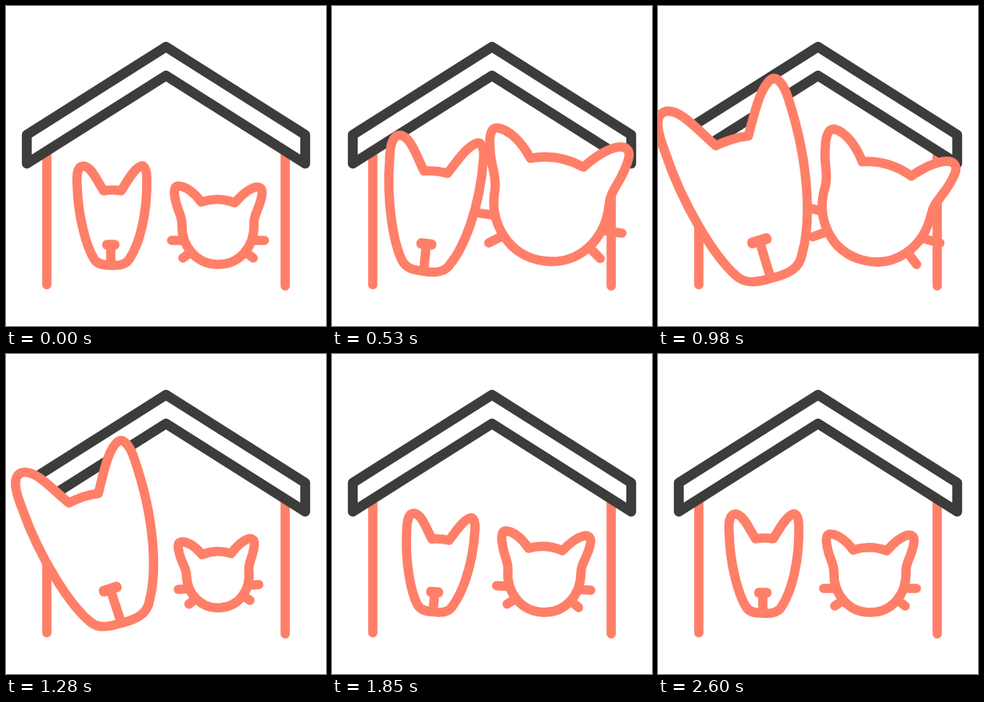
An HTML page that plays this animation: 400 px wide and 400 px high, repeating every 2630 ms.

```html
<!DOCTYPE html>
<html lang="en">
<head>
<meta charset="utf-8">
<title>Pet house</title>
<style>
  html, body { margin: 0; width: 100%; height: 100%; overflow: hidden; background: #fff; }
  svg { display: block; width: 100%; height: 100%; }
  path { fill: none; stroke: #ff7f68; stroke-width: 11.6; stroke-linecap: round; stroke-linejoin: round; vector-effect: non-scaling-stroke; }
  .face { fill: #fff; }
  .nose { fill: #ff7f68; }
  .roof { fill: #fff; stroke: #3c3c3b; stroke-width: 12.4; }
</style>
</head>
<body>
<svg viewBox="0 0 400 400">
  <path d="M51 186V348.500M349 186V350"/>
  <path class="roof" d="M200 51L374 161V197L200 87L26 197V161Z"/>
  <g id="cat">
    <path class="face" d="M244 245C236 234 225 225 215 225C209 226 210 235 212 243C214 255 220 262 220 273C219 300 238 323 265 323C293 323 311 300 310 272C309 261 318 252 320 235C321 227 316 225 310 227C301 230 293 238 286 246Q265 238 244 245Z"/>
    <path d="M207 293H222M221 315L231 308M309 293H323M300 308L309 315"/>
  </g>
  <g id="dog">
    <path class="face" d="M122 231C114 219 107 201 97 200C89 200 88 211 89 225C90 262 100 300 110 316C114 323 122 324 131 324C143 325 151 323 155 315C166 298 177 262 176 215C176 205 173 199 169 200C160 203 151 220 144 231Q133 229 122 231Z"/>
    <path class="nose" d="M126 298H136V299H126Z"/>
    <path d="M131 299V321"/>
  </g>
</svg>
<script>
const LOOP = 2630, HOLD = 230, STEP = 30;
const START = 200, LAG = 100, FREQ = 0.0075;

// Rest centre, full-size centre, growth, turn in degrees, and timing in ms
const cat = { id: 'cat', rest: [265, 280], big: [275, 245], grow: 0.71, turn: 15, rise: 440, release: 880, nudge: 0 };
const dog = { id: 'dog', rest: [131, 265], big: [108, 232], grow: 0.92, turn: -18, rise: 800, release: 1200, nudge: 10 };

const clamp = u => Math.min(1, Math.max(0, u));
const ease = u => { u = clamp(u); return u * u * (3 - 2 * u); };

// Damped swing from 1 to 0, starting at rest
const spring = (t, damp) =>
  Math.exp(-damp * t) * (Math.cos(FREQ * t) + damp / FREQ * Math.sin(FREQ * t));

// Swell to 1, hold, then spring back
const swell = (pet, t, damp) => t < pet.release
  ? ease((t - START) / pet.rise)
  : spring(t - pet.release, damp);

function place(pet, t) {
  const settle = 1 - ease((t - 2120) / 480);
  const size = swell(pet, t, 0.004) * settle;
  const swing = swell(pet, t - LAG, 0.002) * settle;
  const push = Math.sin(Math.PI * clamp((t - START) / 540));
  const [x, y] = pet.rest.map((p, i) => p + (pet.big[i] - p) * Math.max(0, size));
  const angle = pet.turn * swing + pet.nudge * push;
  document.getElementById(pet.id).setAttribute('transform',
    `translate(${x} ${y}) rotate(${angle}) scale(${1 + pet.grow * size}) translate(${-pet.rest[0]} ${-pet.rest[1]})`);
}

function draw(time) {
  const t = time % LOOP;
  const tick = t < HOLD ? 0 : HOLD + Math.floor((t - HOLD) / STEP) * STEP;
  place(cat, tick);
  place(dog, tick);
}

const begin = performance.now();
function frame() {
  draw(performance.now() - begin);
  requestAnimationFrame(frame);
}
frame();
</script>
</body>
</html>
```
